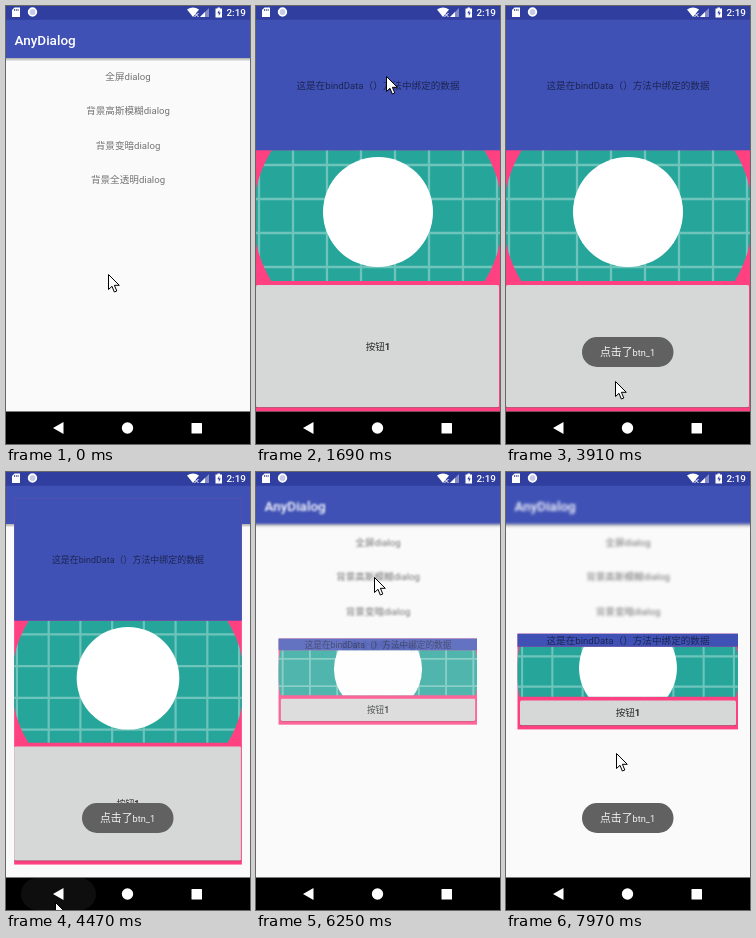
An HTML page that plays this animation: 244x438 px, repeating every 8000 ms.

```html
<!DOCTYPE html>
<html lang="zh-CN">
<head>
<meta charset="utf-8">
<style>
html, body { margin: 0; width: 100%; height: 100%; overflow: hidden; background: #000; }
svg { display: block; width: 244px; height: 438px; }
text { font: 9.6px Roboto, "Noto Sans CJK SC", "Noto Sans CJK", sans-serif; }
.mid { text-anchor: middle; fill-opacity: .54; }
.button { text-anchor: middle; fill-opacity: .8; }
.button tspan { font-weight: 600; }
</style>
</head>
<body>
<svg id="stage" viewBox="0 0 244 438"></svg>
<script>
const stage = document.getElementById('stage');
const $ = id => document.getElementById(id);

const rect = (x, y, w, h, fill, more = '') =>
  `<rect x="${x}" y="${y}" width="${w}" height="${h}" fill="${fill}" ${more}/>`;
const label = (x, y, text, cls = 'mid') => `<text class="${cls}" x="${x}" y="${y}">${text}</text>`;

// Round teal picture in unit scale around its own centre
function picture() {
  let lines = '';
  for (let p = -119; p < 130; p += 34) lines += `M${p} -130V130M-130 ${p}H130`;
  return `<g clip-path="url(#disc)">${rect(-130, -130, 260, 260, '#26a69a')}
    <path d="${lines}" stroke="#fff" stroke-opacity=".33" stroke-width="2.3"/></g>
    <circle cy="-4" r="55" fill="#fff"/>`;
}

function dialog(id, { x, y, w, h, head, pic, scale, picY, btn }) {
  const [bx, by, bw, bh] = btn;
  return `<g id="${id}">
    ${rect(x, y, w, h, '#ff4081')}
    <clipPath id="${id}Clip">${rect(x, y + head, w, pic, '#000')}</clipPath>
    <g clip-path="url(#${id}Clip)"><g transform="translate(122 ${picY}) scale(${scale})">${picture()}</g></g>
    ${rect(x, y, w, head, '#3f51b5')}
    ${label(122, y + head / 2 + 3.7, '这是在bindData（）方法中绑定的数据')}
    ${rect(bx, by + .8, bw, bh, '#000', 'rx="1.5" fill-opacity=".3"')}
    ${rect(bx, by, bw, bh, '#d6d7d7', 'rx="1.5"')}
    ${rect(bx, by, bw, bh, '#000', `rx="1.5" id="${id}Press"`)}
    ${label(122, by + bh / 2 + 3.5, '按钮<tspan>1</tspan>', 'button')}
  </g>`;
}

const items = ['全屏dialog', '背景高斯模糊dialog', '背景变暗dialog', '背景全透明dialog'];

stage.innerHTML = `
  <defs>
    <clipPath id="disc"><circle r="125"/></clipPath>
    <linearGradient id="shade" x2="0" y2="1">
      <stop stop-opacity=".32"/><stop offset="1" stop-opacity="0"/>
    </linearGradient>
  </defs>
  <g id="page">
    ${rect(-20, 40, 284, 400, '#fafafa')}
    ${rect(-20, -20, 284, 72, '#3f51b5')}
    ${rect(-20, 52, 284, 3.5, 'url(#shade)')}
    <text x="8.6" y="38.6" fill="#fff" style="font-size:13.5px;font-weight:500">AnyDialog</text>
    ${items.map((s, i) => label(122, 73.6 + 34.5 * i, s)).join('')}
  </g>
  ${dialog('full', { x: 0, y: 13.8, w: 244, h: 391.8, head: 130.5, pic: 130.7, scale: 1, picY: 210, btn: [0, 279, 243, 122.3] })}
  ${dialog('card', { x: 11.5, y: 161.7, w: 220.5, h: 95.7, head: 13, pic: 50, scale: .89, picY: 199.5, btn: [14, 228.5, 216, 24.7] })}
  ${rect(0, 0, 244, 13.8, '#303f9f')}
  <g fill="#fff">
    <path d="M8.5 1.5H14V11H6V4Z"/>
    <path d="M8.5 3v2M10.3 3v2M12.1 3v2" stroke="#303f9f" stroke-width=".8"/>
    <circle cx="26.5" cy="6" r="3.8" fill="#c5cae9" stroke="#fff" stroke-width="1.8"/>
    <path d="M181 3.5Q187 -.5 193 3.5L187 11Z"/>
    <path d="M188.5 7l4 4m0-4l-4 4" stroke="#fff"/>
    <path d="M203 2V11H194Z" fill-opacity=".4"/><path d="M199 6V11H194Z"/>
    <path d="M209.5 2.5h2v-1h2.5v1h2V11.5h-6.5Z"/>
    <path d="M213.3 4l-2 3.3h1.5v2.7l2-3.5h-1.5Z" fill="#303f9f"/>
    <text x="220.5" y="9.8" style="font-size:9.9px;font-weight:500">2:19</text>
  </g>
  ${rect(0, 405.5, 244, 32.5, '#000')}
  ${rect(15, 406, 75, 32, '#fff', 'rx="16" id="back"')}
  <g fill="#fff">
    <path d="M47 422L57.5 416V428Z"/>
    <circle cx="121.5" cy="422" r="5.7"/>
    ${rect(185.5, 417, 10.5, 10.5, '#fff', 'rx=".5"')}
  </g>
  <g id="toast">
    ${rect(76, 331, 91.5, 30, '#616161', 'rx="15"')}
    <text x="121.5" y="350.2" text-anchor="middle" fill="#fff" fill-opacity=".92" style="font-size:10.9px">点击了<tspan font-size="9.2px">btn_1</tspan></text>
  </g>
  <path id="cursor" d="M.5 .5V15.5L4 12.3L6.3 18L8.8 17L6.4 11.3H11.3Z" fill="#fff" stroke="#000"/>`;

// Fraction done after n equal jumps, the first at a and the last at b
function steps(t, a, b, n) {
  if (t < a) return 0;
  return Math.min(1, (Math.floor((t - a) / (b - a) * (n - 1) + 1e-6) + 1) / n);
}

// start, end, jumps, target, optional bend point
const moves = [
  [280, 1040, 11, [130, 73]],
  [1120, 1140, 2, [130, 70]],
  [2150, 2910, 11, [111, 363], [36, 230]],
  [2990, 2991, 1, [110, 367]],
  [3910, 4230, 5, [49, 430], [106, 405]],
  [4780, 5700, 13, [118, 105]],
  [6720, 7200, 8, [124, 237]],
  [7740, 7970, 4, [110, 281]]
];

function cursorAt(t) {
  let from = [102, 268];
  for (const [a, b, n, to, bend] of moves) {
    if (t < a) break;
    const p = steps(t, a, b, n), s = p * p * (3 - 2 * p);
    from = from.map((v, i) => {
      const c = bend ? bend[i] : (v + to[i]) / 2;
      return v * (1 - s) ** 2 + 2 * c * s * (1 - s) + to[i] * s * s;
    });
  }
  return from;
}

function show(id, opacity) {
  $(id).setAttribute('opacity', opacity);
}

function pose(id, p) {
  show(id, Math.min(1, 1.6 * p));
  $(id).setAttribute('transform', `translate(122 210) scale(${.8 + .2 * p}) translate(-122 -210)`);
}

function draw(t) {
  const card = steps(t, 6250, 6320, 2);
  pose('full', steps(t, 1610, 1690, 2) - steps(t, 4458, 4614, 3));
  pose('card', card);
  $('page').style.filter = card ? `blur(${1.75 * card}px)` : 'none';
  show('fullPress', .13 * (steps(t, 3140, 3300, 3) - steps(t, 3450, 3750, 5)));
  show('cardPress', .13 * (steps(t, 7430, 7510, 2) - steps(t, 7590, 7820, 4)));
  show('back', .08 * (steps(t, 4380, 4536, 3) - steps(t, 4780, 5080, 5)));
  show('toast', steps(t, 3450, 3680, 4) - steps(t, 5240, 5470, 4) + steps(t, 7510, 7740, 4));
  $('cursor').setAttribute('transform', `translate(${cursorAt(t).map(Math.round)})`);
}

const start = performance.now();
function frame() {
  draw((performance.now() - start) % 8000);
  requestAnimationFrame(frame);
}
frame();
</script>
</body>
</html>
```
